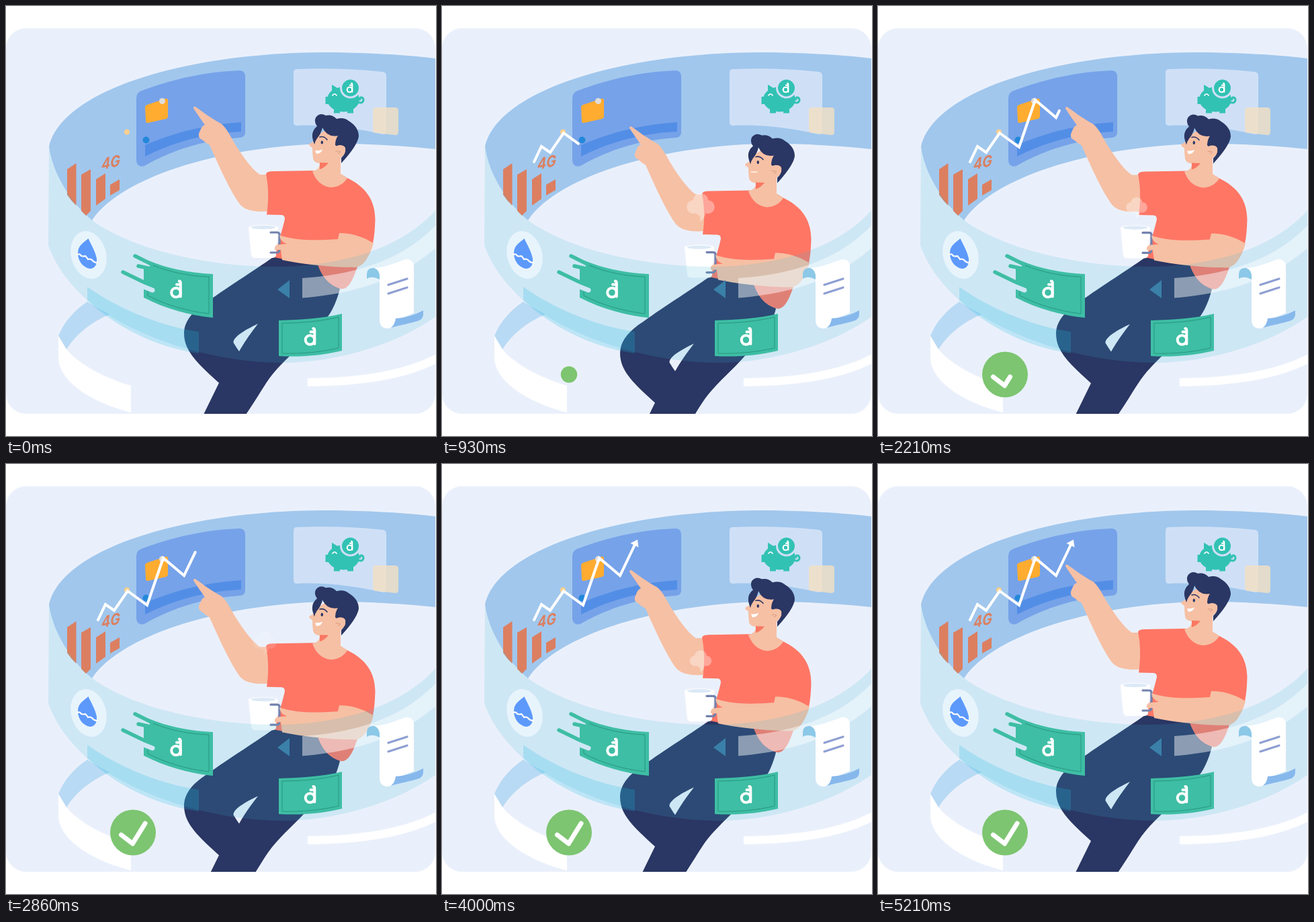
These frames come from a looping animation (640 by 640 pixels, 6000 ms). An HTML page:

```html
<!DOCTYPE html>
<html lang="en">
<head>
<meta charset="utf-8">
<title>Digital wallet ring</title>
<style>
html,body{margin:0;width:100%;height:100%;overflow:hidden;background:#fff}
svg{display:block;width:100vw;height:100vh}
.skin{fill:#f6c0a4}.hair{fill:#2a3663}.coral{fill:#ff7665}.teal{fill:#32c2b4}.bill{fill:#3ebea4}
.bar{fill:#dc7f60}.white{fill:#fff}
.line{fill:none;stroke-linecap:round}
.edge{fill:none;stroke:#279681;stroke-width:1}
</style>
</head>
<body>
<svg viewBox="0 0 640 640">
<defs>
  <clipPath id="stage"><rect y="33" width="639" height="574" rx="30"/></clipPath>
  <g id="coin" class="line" stroke="#fff" stroke-width="4">
    <circle r="6.800"/>
    <path d="M6.800 6V-14q0-3-2-3M1-12H6"/>
  </g>
</defs>
<g clip-path="url(#stage)">
  <rect y="33" width="640" height="575" fill="#eaf0fb"/>

  <!-- lower ring -->
  <path fill="#b9daf4" d="M78 491C87 469 102 453 121 440Q138 451 154 459C128 470 105 487 90 511Z"/>
  <path class="white" d="M78 491L90 511C108 533 145 553 186 565V605C125 589 78 558 78 522Z"/>
  <path class="white" d="M449 554C530 554 598 541 640 518V532C598 554 530 566 449 566Z"/>

  <!-- back of the main ring -->
  <path fill="#a1c7ed" d="M64 209C85 122 275 70 470 69C530 69 590 72 640 78V213C590 208 530 204 480 205C320 208 170 255 128 319C88 285 68 240 64 209Z"/>
  <path fill="#76a2e9" d="M194 137q0-8 8-11C250 108 298 98 347 96q9 0 9 9V188q0 7-8 8C300 199 250 212 206 238q-11 3-12-8Z"/>
  <path fill="#538ee6" d="M207 207C250 188 300 176 350 173V187C300 189 250 202 207 224Z"/>
  <path fill="#ffac30" d="M207 151q0-3 3-4L237 138q4-1 4 3V164q0 3-3 4L211 174q-3 0-3-3Z"/>
  <circle cx="180" cy="187.500" r="4" fill="#f9d08f"/>
  <circle cx="208.500" cy="199.500" r="5" fill="#2488da"/>
  <circle cx="232.500" cy="141.500" r="4.500" fill="#e0dcd8"/>
  <g class="bar">
    <path d="M91 243L104.500 234V297Q97 290 91 281Z"/>
    <path d="M112 251L126 243V305L119 312L112 305Z"/>
    <path d="M134 258L148 249V287L134 297Z"/>
    <path d="M155 266L169 258V274L155 282Z"/>
    <text transform="matrix(.85 -.2 0 1 142 244)" font-family="Inter,'Liberation Sans',sans-serif" font-size="23" font-weight="700" font-style="italic">4G</text>
  </g>
  <path fill="#cfe0f6" d="M433 94C480 92 520 94 561 98q5 1 5 6V186q0 5-5 5C520 181 470 176 433 178q-5 0-5-5V99q0-5 5-5Z"/>
  <path fill="#f4e0c4" opacity=".8" d="M551 151H579q5 0 5 5V187q0 6-5 5L551 189q-5 0-5-5V156q0-5 5-5Z"/>
  <g class="teal">
    <path d="M485 117l8 5 6 5-14 8Z"/>
    <ellipse cx="502" cy="139" rx="24" ry="18.500"/>
    <path d="M475.500 135h8v11h-8ZM488 150h9v9.500h-9ZM508 150h9v9.500h-9Z"/>
    <path class="line" stroke="#32c2b4" stroke-width="3" d="M523 143q8 3 9-3 0-4-4-4-2 1-1 3"/>
    <circle cx="512.500" cy="122" r="14" stroke="#cfe0f6" stroke-width="3"/>
    <path class="line" stroke="#fff" stroke-width="1.700" d="M486 133q3-4 6 0"/>
  </g>
  <use href="#coin" transform="translate(511.500 124.500)scale(.55)"/>

  <g class="line" stroke="#fff" stroke-width="4">
    <path id="chart" pathLength="100" d="M137 232L148 209L161 218L181 189L210 210L234 140L265 166L288 118"/>
  </g>
  <path id="arrow" class="white" d="M291 112.500L292.500 124L280.500 118Z"/>

  <g id="man">
    <path class="hair" fill-rule="evenodd" d="M400 372C380 387 330 418 300 440C270 459 262 477 266 497C270 519 292 538 317 561L294 608H357C374 584 384 564 396 549C412 529 433 512 452 490C476 470 488 455 497 421L470 385ZM375 473C358 481 338 492 338.500 501Q344 510 347 514Q357 496 375 473Z"/>
    <path class="skin" d="M279 152q0-3 3-2C292 157 308 169 320 175C328 181 333 192 340 204C353 225 367 244 378 251H390L394 305Q360 309 348 295C334 276 318 241 303 207Q296 203 292 199Q286 197 287 190L290 183Q292 178 296 177C290 168 283 159 279 152Z"/>
    <path class="coral" d="M387 250Q388 246 397 246L456 245H490L508 256C537 270 549 290 549.500 317Q549 340 546 353L536 365L523 388C515 413 507 422 499 421C480 416 470 402 464 385L440 382L399 374C404 356 412 331 415 317Q415 311 410 311L388 310.500C391 290 391 270 387 250Z"/>
    <path class="skin" d="M456 246Q468 244 467 232L480 214H498V250L508 256Q500 269 484 270Q464 268 456 246Z"/>
    <path class="skin" d="M463 193Q460 202 452 205Q450 207 453 209L456 211Q456 219 457 227Q458 233 467 234Q484 237 496 228L506 218V195L480 182Z"/>
    <path fill="#f97862" d="M467 233L480 233.500Q474 241 467 243Z"/>
    <path class="hair" d="M457 200Q453 187 463 179Q458 173 461 166Q467 158 476 163Q485 161 492 168Q503 165 510 171Q525 180 525 194Q523 208 499 234V226Q506 220 505 211Q502 205 493 209L490 207Q490 199 494 193Q478 196 471 181Q469 190 463 197Q460 201 459 206Z"/>
    <path class="skin" d="M491 209q8-5 14 3q2 9-9 14Z"/>
    <g class="line" stroke="#2a3663" stroke-width="1.600">
      <path d="M467 195q6-2 11 4"/>
      <path stroke="#d79b82" stroke-width="1" d="M491 216q4-1 7 1q-2 3-4 2"/>
    </g>
    <ellipse class="hair" cx="470.300" cy="203" rx="1.700" ry="2.600"/>
    <path id="smile" class="white" d="M460 215Q466 216 471 213.500Q469 220 462 220Z"/>
    <path id="calm" class="line" stroke="#fff" stroke-width="1.300" d="M460 217.500H469"/>

    <path class="white" d="M361 329C368 325 398 325 405 329L402 371Q401 375 396 375H371Q366 375 365 370Z"/>
    <ellipse cx="383" cy="329.500" rx="18" ry="2.700" fill="#dce9f6"/>
    <path class="line" stroke="#7282ae" stroke-width="3.200" d="M394 337H403q4 0 4 3V362q0 5-4 5H394"/>
    <path class="skin" d="M407 341C432 350 462 349 494 347L496 338C516 338 532 344 547 353C541 374 531 389 519 389C482 389 440 384 411 378L409 363L400 363Q399 355 407 355L418 354Q408 351 407 341Z"/>
  </g>
  <g id="steam" class="white">
    <circle cx="-8.500" cy="2" r="8"/><circle cy="-5" r="9"/><circle cx="8.500" cy="2" r="8"/><circle cy="5" r="7"/>
    <path d="M-5 8Q1 12-1 19Q6 15 6 7Z"/>
  </g>

  <!-- front of the main ring tints what lies behind it -->
  <path fill="#3cb2d2" opacity=".16" d="M64 209C68 240 88 285 128 319C200 370 320 388 400 388C500 388 590 360 640 303V462C580 505 490 531 410 531C290 530 180 485 121 438C90 410 72 382 63 356Z"/>
  <path class="white" opacity=".45" d="M441 405C530 399 594 374 640 326V360C594 399 540 426 441 434.500Z"/>
  <path fill="#1eb9e1" opacity=".22" d="M121 418C165 449 224 475 287 485V517C224 508 165 479 121 438Z"/>
  <path fill="#3a80a9" d="M404 422L422 408V435Z"/>

  <ellipse cx="123" cy="370.500" rx="26" ry="36" transform="rotate(-15 123 370.500)" fill="#e8f4fc"/>
  <path fill="#5c99fb" d="M122.500 346C126 354 133 365 135 376C136 386 131 391 125 391C114 389 107 379 107 368C107 356 116 352 122.500 346Z"/>
  <path class="line" stroke="#fff" stroke-width="2.200" d="M106 370q4-2 6 2q4 1 6 0q3 3 4 5q4-1 6 1q3 4 8 4"/>

  <path class="bill" d="M205 391H215L212 379C242 391 272 397 308 399V464C272 460 238 451 205 434Z"/>
  <path class="edge" d="M219 386C244 396 272 402 302 403V458C270 454 240 446 211 431V425"/>
  <g class="line" stroke="#3ebea4" stroke-width="5.500">
    <path d="M192 372L216 384M197 387L215 391M174 396L207 412"/>
    <path stroke="#cfe7f5" stroke-width="7" d="M203 417L218 423"/>
  </g>
  <use href="#coin" x="253" y="426.500"/>
  <path class="bill" d="M406 468C440 467 470 465 500 458V513C470 520 440 523 406 521Z"/>
  <path class="edge" d="M411 472C440 472 470 469 495 463V509C470 515 440 518 411 517Z"/>
  <use href="#coin" x="452.500" y="497"/>

  <path fill="#8cc8e8" d="M537 406V399Q537 391 545 390H556V407Q545 401 537 406Z"/>
  <path class="white" d="M548 390C565 389 580 382 595 377Q607 376 607 389V457L580 468Q578 480 567 480Q556 479 556 467V405Q557 393 548 390Z"/>
  <path fill="#86b8ec" d="M580 465C595 464 608 460 621 453V460Q620 467 612 469C600 473 588 474 573 479Q579 474 580 465Z"/>
  <path class="line" stroke="#8e9fd3" stroke-width="3.200" d="M569 415L597 406M569 428L597 419"/>

  <g id="badge"><circle r="34" fill="#7dc571"/></g>
  <path id="tick" class="line" stroke="#fff" stroke-width="7" stroke-linejoin="round" pathLength="100" d="M171.500 552L188.500 565L207 535"/>
</g>
</svg>
<script>
const LOOP = 6000;
const $ = id => document.getElementById(id);
const clamp = v => Math.max(0, Math.min(1, v));

// cubic-bezier(.25, .1, .25, 1)
function ease(p) {
  if (p <= 0 || p >= 1) return clamp(p);
  let lo = 0, hi = 1, s = .5;
  for (let i = 0; i < 22; i++) {
    s = (lo + hi) / 2;
    const x = .75 * s * (1 - s) + s ** 3;
    if (x < p) lo = s; else hi = s;
  }
  return .3 * s * (1 - s) ** 2 + 3 * s * s * (1 - s) + s ** 3;
}

const span = (t, a, b) => clamp((t - a) / (b - a));
const move = (t, a, b) => ease(span(t, a, b));

// start, end, first y, last y, first scale, last scale
const puffs = [
  [300, 1720, 322, 265, 1.1, 1.46],
  [1740, 2950, 322, 260, .9, 1.05],
  [3400, 4850, 330, 236, .9, 1.1]
];

function show(el, on) {
  el.style.visibility = on ? 'visible' : 'hidden';
}

function draw(el, part) {
  show(el, part > .005);
  el.setAttribute('stroke-dasharray', `${100 * part} 200`);
}

function render(t) {
  const sink = 30 * (move(t, 0, 1100) - move(t, 1370, 2370) + move(t, 2370, 3550) - move(t, 3550, 4600));
  $('man').setAttribute('transform', `translate(0 ${sink})`);

  const calm = t > 700 && t < 1200 || t > 4200 && t < 4700;
  show($('calm'), calm);
  show($('smile'), !calm);

  draw($('chart'), move(t, 0, 4000));
  show($('arrow'), t > 3290);

  const size = 1.11 * move(t, 810, 1380) - .11 * move(t, 1480, 2200);
  $('badge').setAttribute('transform', `translate(189 548.5) scale(${size})`);
  draw($('tick'), move(t, 2000, 2560));

  const puff = puffs.find(p => t > p[0] && t < p[1]);
  show($('steam'), puff);
  if (puff) {
    const [a, b, y0, y1, s0, s1] = puff;
    const p = span(t, a, b);
    $('steam').setAttribute('transform', `translate(385 ${y0 + (y1 - y0) * p}) scale(${s0 + (s1 - s0) * p})`);
    $('steam').setAttribute('opacity', .35 * clamp(p * 9) * clamp((1 - p) * 5));
  }
}

const begin = performance.now();
function tick() {
  render((performance.now() - begin) % LOOP);
  requestAnimationFrame(tick);
}
tick();
</script>
</body>
</html>
```
